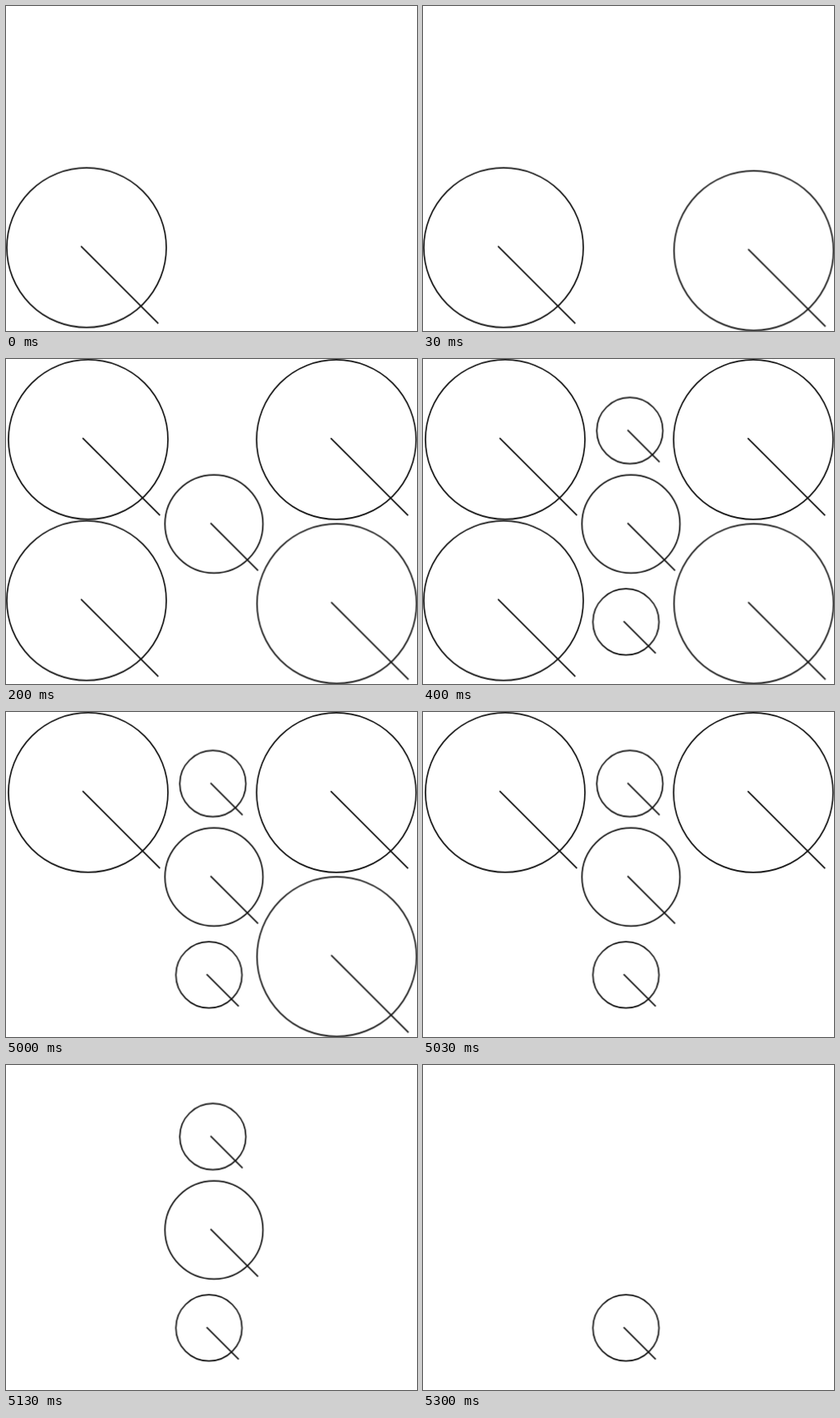
An HTML page that plays this animation: 500x395 px, repeating every 5400 ms.

```html
<!DOCTYPE html>
<html lang="en">
<head>
<meta charset="utf-8">
<title>Circles</title>
<style>
  html, body { margin: 0; width: 100%; height: 100%; overflow: hidden; background: #fff; }
  svg { display: block; width: 500px; height: 395px; }
  circle, line { fill: none; stroke: #111; stroke-width: 1.7; vector-effect: non-scaling-stroke; }
  /* Each dial is shown for 5000 of 5400 ms, shifted by its own start time. */
  use { animation: show 5400ms step-end calc(var(--at) * 1ms - 5400ms) infinite; }
  @keyframes show {
    0% { opacity: 1; }
    92.5925%, 100% { opacity: 0; }
  }
</style>
</head>
<body>
<svg viewBox="0 0 500 395">
  <defs>
    <g id="dial">
      <circle r="100"/>
      <line x1="-7" y1="-1.8" x2="90" y2="95"/>
    </g>
  </defs>
  <use href="#dial" style="--at: 0" transform="translate(98 293.7) scale(.97)"/>
  <use href="#dial" style="--at: 30" transform="translate(402.4 297.4) scale(.97)"/>
  <use href="#dial" style="--at: 60" transform="translate(401.8 98) scale(.97)"/>
  <use href="#dial" style="--at: 130" transform="translate(100 97.8) scale(.97)"/>
  <use href="#dial" style="--at: 200" transform="translate(253 200.5) scale(.596)"/>
  <use href="#dial" style="--at: 300" transform="translate(251.6 87) scale(.402)"/>
  <use href="#dial" style="--at: 400" transform="translate(246.9 319.5) scale(.402)"/>
</svg>
</body>
</html>
```
